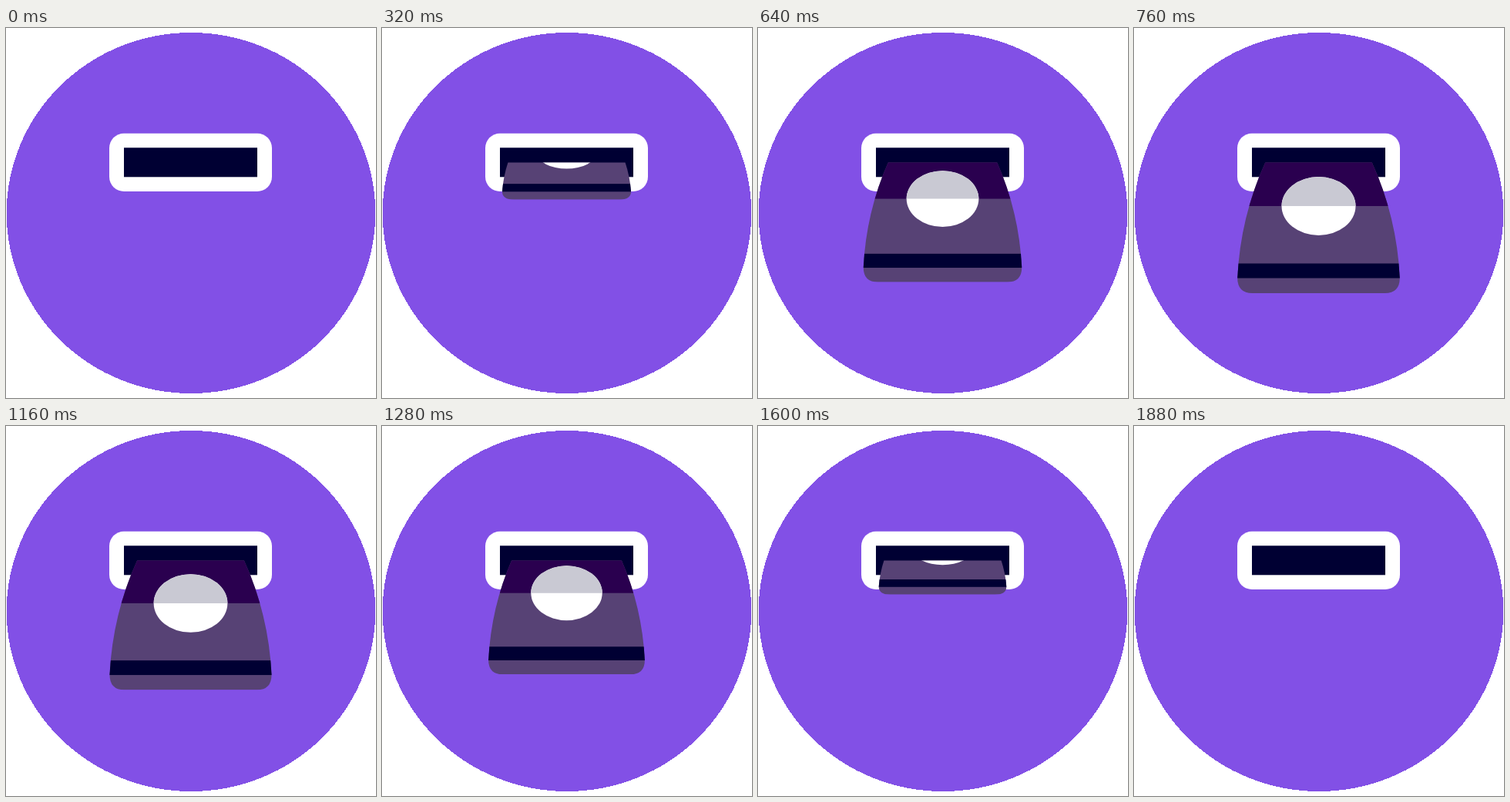
An HTML page for the animation above (1920 ms loop, 480x480 px).

```html
<!DOCTYPE html>
<html lang="en">
<head>
<meta charset="utf-8">
<title>Banknote slot</title>
<style>
  html, body { margin: 0; width: 100%; height: 100%; overflow: hidden; background: #fff; }
  svg { display: block; width: 100%; height: 100%; }
</style>
</head>
<body>
<svg viewBox="0 0 480 480">
  <defs>
    <clipPath id="opening"><rect y="174.5" width="480" height="306"/></clipPath>
    <clipPath id="outline">
      <path d="M-69 -170 Q-101.5 -99 -105.3 -20 Q-105.3 0 -86 0 H86 Q105.3 0 105.3 -20 Q101.5 -99 69 -170 Z"/>
    </clipPath>
  </defs>
  <ellipse cx="240" cy="240" rx="239.3" ry="234" fill="#8250e6" shape-rendering="crispEdges"/>
  <rect x="134" y="136.7" width="211" height="75.3" rx="19" fill="#fff"/>
  <rect x="153" y="155.3" width="173" height="38" fill="#000033"/>
  <g clip-path="url(#opening)">
    <!-- local origin: middle of the note's bottom edge -->
    <g id="note">
      <g clip-path="url(#outline)">
        <rect x="-110" y="-170" width="220" height="170" fill="#574275"/>
        <rect x="-110" y="-170" width="220" height="57" fill="#2a004f"/>
        <rect x="-110" y="-38.5" width="220" height="19" fill="#000033"/>
      </g>
      <ellipse cy="-113" rx="48" ry="38" fill="#fff"/>
      <path d="M-48 -113 A48 38 0 0 1 48 -113 Z" fill="#c9c9d3"/>
    </g>
  </g>
</svg>
<script>
  const LOOP = 1920, STEP = 40;
  const SLOT_Y = 174, LENGTH = 170, CENTER_X = 239.5;
  const note = document.getElementById("note");

  const clamp = x => Math.min(1, Math.max(0, x));
  const ease = x => x * x * (3 - 2 * x);
  const ramp = (t, from, to) => ease(clamp((t - from) / (to - from)));

  function draw(t) {
    const out = ramp(t, 44, 760) - ramp(t, 1120, 1880);
    const u = Math.pow(clamp(out), 1.13);
    const y = SLOT_Y + LENGTH * u;
    note.setAttribute("visibility", u > 0 ? "visible" : "hidden");
    note.setAttribute("transform",
      `translate(${CENTER_X} ${y}) scale(${0.71 + 0.29 * u} ${Math.sqrt(u)})`);
  }

  const start = performance.now();
  function tick() {
    const t = (performance.now() - start) % LOOP;
    draw(Math.floor(t / STEP) * STEP);
    requestAnimationFrame(tick);
  }
  draw(0);
  requestAnimationFrame(tick);
</script>
</body>
</html>
```
